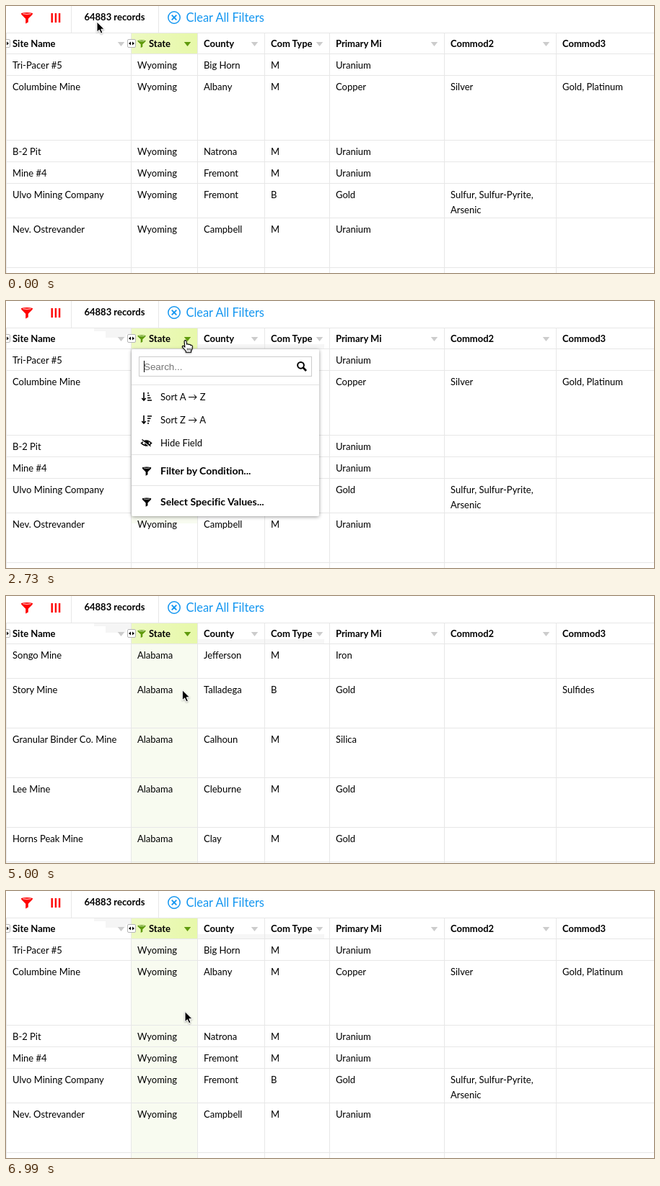
An HTML page for the animation above (7710 ms loop, 898 px wide and 371 px high).

```html
<!DOCTYPE html>
<html lang="en">
<head>
<meta charset="utf-8">
<title>Column sort</title>
<style>
  html, body { margin: 0; width: 100%; height: 100%; overflow: hidden; background: #fff; }
  svg { display: block; width: 898px; height: 371px; }
  text { font-family: Lato, sans-serif; font-size: 13px; white-space: pre; }
  .b { font-weight: 700; }
  .menu text { font-variant-ligatures: none; }
  .menu .b { font-size: 14px; }
  .menu .hint { font: 13.33px 'Liberation Sans', sans-serif; }
</style>
</head>
<body>
<svg id="stage" viewBox="0 0 898 371">
  <defs>
    <linearGradient id="lime">
      <stop offset="0" stop-color="#edf9c1"/>
      <stop offset="1" stop-color="#e7f8aa"/>
    </linearGradient>
    <filter id="soft" x="-10%" y="-10%" width="120%" height="125%">
      <feDropShadow dx="0" dy="1" stdDeviation="2.5" flood-opacity=".4"/>
    </filter>
    <filter id="dim" x="-50%" y="-50%" width="200%" height="200%">
      <feDropShadow dx="0" dy="1" stdDeviation="1" flood-opacity=".35"/>
    </filter>
    <g id="funnel">
      <path d="M-8-6.6Q0-8.6 8-6.6Q8-5 7-4L1.8 1.2V6L-1.8 8V1.2L-7-4Q-8-5-8-6.6Z"/>
      <path d="M-5.5-5.7Q0-4.6 5.5-5.7" fill="none" stroke="#fff" stroke-width=".9"/>
    </g>
    <g id="grip">
      <rect x="-5.5" y="-5.5" width="11" height="11" rx="1.5" fill="#fff" stroke="#b5b5b5"/>
      <path d="M-1-2.5V2.5L-4 0ZM1-2.5V2.5L4 0Z"/>
    </g>
    <path id="down" d="M-4.7-3H4.7L0 3Z"/>
  </defs>

  <rect width="898" height="371" fill="#fff"/>
  <rect id="tint" x="174" y="67" width="91" fill="#f8fbf0"/>
  <path id="trail" d="M122 38H173V46H166V51H138V42H122Z" fill="#f5f5f5"/>
  <path id="strip" d="M266 60H441V66H266Z" fill="#f6f6f6"/>
  <rect x="174" y="38" width="91" height="28" fill="url(#lime)"/>
  <g id="grid"></g>

  <g fill="#f00">
    <use href="#funnel" x="29" y="16.5"/>
    <path d="M62.5 10h2.4v13h-2.4ZM67.7 10h2.4v13h-2.4ZM72.9 10h2.4v13h-2.4Z"/>
  </g>
  <text class="b" x="108.5" y="20">64883 records</text>
  <g fill="none" stroke="#1396f0" stroke-width="1.5">
    <circle cx="233" cy="16" r="8.2"/>
    <path d="M229.7 12.7l6.6 6.6M236.3 12.7l-6.6 6.6" stroke-width="1.9"/>
  </g>
  <text x="249.5" y="22" fill="#1396f0" style="font-size:16.4px">Clear All Filters</text>

  <g id="head"></g>
  <use href="#grip" x="0" y="52"/>
  <use href="#grip" x="174" y="52"/>
  <use href="#funnel" transform="translate(188 52.5) scale(.7)" fill="#5f9a0d"/>

  <g id="wyoming"></g>
  <g id="alabama"></g>

  <g id="menu" class="menu">
    <rect x="174" y="67" width="260" height="232" rx="3" fill="#fff" filter="url(#soft)"/>
    <rect x="184.5" y="77.5" width="239" height="27" fill="#fff" stroke="#ccc"/>
    <path d="M191.5 83V99" stroke="#000"/>
    <text class="hint" x="191" y="96" fill="#757575">Search...</text>
    <g fill="none" stroke="#000" stroke-width="2">
      <circle cx="408.5" cy="89.3" r="4.4"/>
      <path d="M411.8 92.6L416 97" stroke-width="2.8"/>
    </g>
    <path d="M174 116.5H434M174 213.5H434M174 256.5H434" stroke="#e4e4e4"/>
    <g id="items"></g>
    <g fill="none" stroke="#000" stroke-width="1.6">
      <path d="M191 127V137.5M188.3 135L191 138L193.7 135"/>
      <path d="M196 128H198M196 131.3H199M196 134.6H200.5M196 138H202"/>
      <path d="M191 159V169.5M188.3 167L191 170L193.7 167"/>
      <path d="M196 160H202M196 163.3H200.5M196 166.6H199M196 170H198"/>
      <path d="M187.5 197.5Q194.5 190.5 201.5 197.5Q194.5 204.5 187.5 197.5Z"/>
      <circle cx="195" cy="197.5" r="2.2" fill="#000"/>
      <path d="M189 193.7L201 203" stroke="#fff" stroke-width="2"/>
      <path d="M188.500 192.500L200.500 201.800" stroke-width="1.4"/>
    </g>
    <use href="#funnel" transform="translate(195 236.5) scale(.78)"/>
    <use href="#funnel" transform="translate(195 279.5) scale(.78)"/>
  </g>

  <g id="arrow" filter="url(#dim)">
    <path d="M0 0V14.2L3.3 11.2L5.6 16.3L8 15.2L5.8 10.2H10.2Z" stroke="#fff"/>
  </g>
  <g id="hand" filter="url(#dim)">
    <g transform="translate(-1.5 -1.5)">
      <path d="M-1.4 1.2Q0-1 1.5 1.2L2 5.7Q3.6 4.6 4.7 6.1Q6.4 5.2 7.3 6.9Q9.6 6.5 9.8 8.7Q10 12.2 8 14.6V16.7H.8V15L-4 9.7Q-4.6 7.6-2.5 7.9L-.6 9.6Z"
        fill="#fff" stroke="#000" stroke-width="1.1" stroke-linejoin="round"/>
      <path d="M2.8 11V14M4.8 11V14M6.8 11V14" stroke="#000" stroke-width=".8"/>
    </g>
  </g>
</svg>
<script>
const LOOP = 7710, STEP = 116.6;
const $ = id => document.getElementById(id);
const cols = [0, 173, 265, 358, 448, 607, 762];
const pad = i => cols[i] + 9;

function add(parent, tag, attrs, content) {
  const el = document.createElementNS('http://www.w3.org/2000/svg', tag);
  for (const key in attrs) el.setAttribute(key, attrs[key]);
  if (content) el.textContent = content;
  $(parent).appendChild(el);
}
const label = (parent, x, y, str, cls = '') => add(parent, 'text', { x, y, class: cls }, str);
const line = (parent, d) => add(parent, 'path', { d, stroke: '#e7e7e7' });

line('grid', 'M0 37.5H898M0 66.5H898M90.5 0V37M211.5 0V37');
cols.forEach(x => line('grid', `M${x + .5} 38V371`));

['Site Name', 'State', 'County', 'Com Type', 'Primary Mi', 'Commod2', 'Commod3'].forEach((name, i) => {
  label('head', i === 1 ? 198 : pad(i), 57, name, 'b');
  if (i < 6) add('head', 'use', { href: '#down', x: cols[i + 1] - 13.5, y: 53, fill: i === 1 ? '#5f9a0d' : '#ccc' });
});

// Each row: top edge, then its cells; "/" breaks a line.
function table(id, state, rows, end) {
  for (const [top, site, ...rest] of rows) {
    if (top > 66) line(id, `M0 ${top + .5}H898`);
    [site, state, ...rest].forEach((cell, i) =>
      cell.split('/').forEach((part, n) => label(id, pad(i), top + 21 + n * 21, part)));
  }
  line(id, `M0 ${end + .5}H898`);
}
table('wyoming', 'Wyoming', [
  [66, 'Tri-Pacer #5', 'Big Horn', 'M', 'Uranium'],
  [96, 'Columbine Mine', 'Albany', 'M', 'Copper', 'Silver', 'Gold, Platinum'],
  [186, 'B-2 Pit', 'Natrona', 'M', 'Uranium'],
  [216, 'Mine #4', 'Fremont', 'M', 'Uranium'],
  [246, 'Ulvo Mining Company', 'Fremont', 'B', 'Gold', 'Sulfur, Sulfur-Pyrite,/Arsenic'],
  [294, 'Nev. Ostrevander', 'Campbell', 'M', 'Uranium']
], 363);
table('alabama', 'Alabama', [
  [66, 'Songo Mine', 'Jefferson', 'M', 'Iron'],
  [114, 'Story Mine', 'Talladega', 'B', 'Gold', '', 'Sulfides'],
  [183, 'Granular Binder Co. Mine', 'Calhoun', 'M', 'Silica'],
  [252, 'Lee Mine', 'Cleburne', 'M', 'Gold'],
  [321, 'Horns Peak Mine', 'Clay', 'M', 'Gold']
], 369);

[[138, 'Sort A → Z'], [170, 'Sort Z → A'], [202, 'Hide Field'],
 [241, 'Filter by Condition...', 'b'], [284, 'Select Specific Values...', 'b']]
  .forEach(([y, str, cls]) => label('items', 214, y, str, cls));

// Pointer moves: start, number of steps, target.
const home = [126, 22];
const moves = [
  [720, 7, 254, 57], [1540, 1, 251, 50.5], [2250, 2, 250, 56],
  [3080, 3, 244, 136.5], [5000, 6, 248.5, 57.5], [5940, 6, 248, 167.5]
];
const ease = p => p * p * (3 - 2 * p);
const within = (t, a, b) => t >= a && t < b;
const show = (id, on) => $(id).setAttribute('display', on ? 'inline' : 'none');

function pointer(t) {
  let [x, y] = home;
  for (const [start, n, tx, ty] of moves) {
    if (t < start) break;
    const k = ease(Math.min(1, (Math.floor((t - start) / STEP) + 1) / n));
    x += (tx - x) * k;
    y += (ty - y) * k;
  }
  return [x, y];
}

function draw(t) {
  const sorted = within(t, 4160, 6990);
  const hand = within(t, 2250, 3680) || within(t, 5590, 6640);
  show('alabama', sorted);
  show('wyoming', !sorted);
  show('menu', within(t, 2730, 3680) || within(t, 5820, 6640));
  show('trail', t >= 1070);
  show('strip', t >= 2730);
  $('tint').setAttribute('height', t < 2730 ? 0 : t < 4160 ? 242 : 304);
  show('hand', hand);
  show('arrow', !hand);
  $(hand ? 'hand' : 'arrow').setAttribute('transform', `translate(${pointer(t)})`);
}

const begin = performance.now();
function frame() {
  draw((performance.now() - begin) % LOOP);
  requestAnimationFrame(frame);
}
frame();
</script>
</body>
</html>
```
